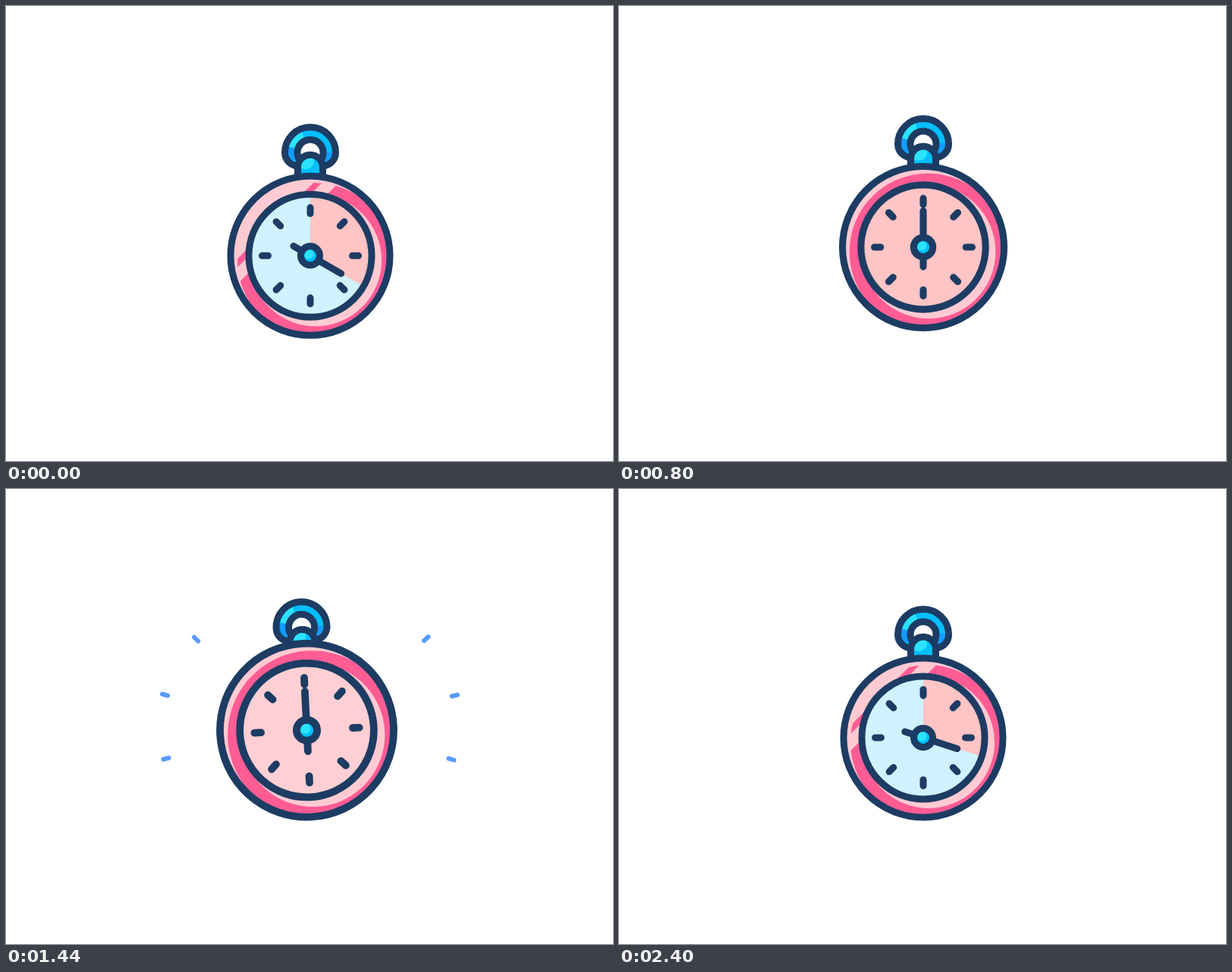
An HTML page for the animation above (2.44 s loop, 800 by 600 pixels).

```html
<!DOCTYPE html>
<html lang="en">
<head>
<meta charset="utf-8">
<title>Stopwatch</title>
<style>
  html, body { margin: 0; width: 100%; height: 100%; overflow: hidden; background: #fff; }
  svg { display: block; width: 100%; height: 100%; }
  .line { fill: none; stroke: #1d3c63; stroke-width: 9; stroke-linecap: round; }
  .spark { stroke: #5a9bff; stroke-width: 6; stroke-linecap: round; }
  .pale { fill: #ffcad2; }
  .rose { fill: #ff5c94; }
  .blue { fill: #00bfff; }
  .cyan { fill: #2ae3ff; }
  .deep { fill: #129cff; }
</style>
</head>
<body>
<svg viewBox="0 0 800 600">
  <defs>
    <clipPath id="rim"><circle r="103"/></clipPath>
    <clipPath id="loop"><path d="M-33.5 0A33.5 33.5 0 0 1 33.5 0C33.5 9 27 17 16 18H-16C-27 17-33.5 9-33.5 0Z"/></clipPath>
    <clipPath id="stem"><path d="M-16.5 34V19.5a16.5 16.5 0 0 1 33 0V34Z"/></clipPath>
  </defs>

  <g id="sparks"></g>

  <g id="watch">
    <g id="bow">
      <g clip-path="url(#loop)">
        <rect class="blue" x="-40" y="-40" width="80" height="80"/>
        <path class="cyan" d="M0 0L-60-16L-40-60L-20-50Z"/>
        <path class="deep" d="M0 0L-60-16V30ZM0 0L60-2V50Z"/>
      </g>
      <circle r="17" fill="#fff"/>
      <circle class="line" r="17"/>
      <path class="line" d="M-16 18C-27 17-33.5 9-33.5 0A33.5 33.5 0 0 1 33.5 0C33.5 9 27 17 16 18"/>
      <g clip-path="url(#stem)">
        <rect class="blue" x="-20" width="40" height="40"/>
        <circle class="cyan" cx="-6" cy="11" r="11"/>
      </g>
      <path class="line" d="M-16.5 34V19.5a16.5 16.5 0 0 1 33 0V34"/>
    </g>

    <g id="body">
      <g clip-path="url(#rim)">
        <circle class="pale" r="103"/>
        <circle class="rose" cx="6" cy="6" r="102"/>
        <circle class="pale" cx="7" cy="6" r="87"/>
        <g transform="rotate(45)">
          <g id="glint" class="pale">
            <rect x="-48" y="-120" width="48" height="240"/>
            <rect x="8" y="-120" width="15.5" height="240"/>
          </g>
        </g>
      </g>
      <circle r="80" fill="#cff2ff"/>
      <circle id="wedge" r="38.75" fill="none" stroke-width="77.5" pathLength="360"/>
      <circle class="line" r="105"/>
      <circle class="line" r="81"/>
      <g id="ticks"></g>
      <path id="hand" class="line" d="M0-47V25.5"/>
      <circle class="blue" r="12.5"/>
      <circle class="cyan" cx="-2" cy="-2" r="6.5"/>
      <circle class="line" r="12.5"/>
    </g>
  </g>
</svg>

<script>
const STEP = 40, STEPS = 61, RING = 20, RESET = 51;
const $ = id => document.getElementById(id);
const move = (id, value) => $(id).setAttribute('transform', value);

function add(parent, name, attrs) {
  const el = document.createElementNS('http://www.w3.org/2000/svg', name);
  for (const key in attrs) el.setAttribute(key, attrs[key]);
  return parent.appendChild(el);
}

for (let a = 0; a < 360; a += 45)
  add($('ticks'), 'path', { class: 'line', d: 'M0-55.5V-63.5', transform: `rotate(${a})` });

// outer end x, y and heading in degrees
const sparks = [
  [248, 195.5, 225], [206, 270.5, 194.5], [207.5, 356.5, 165],
  [556.5, 195, -42], [595, 271.5, -13.5], [590.5, 357.5, 17.5]
].map(([x, y, deg]) => ({
  x, y, dx: Math.cos(deg * Math.PI / 180), dy: Math.sin(deg * Math.PI / 180),
  el: add($('sparks'), 'line', { class: 'spark' })
}));

const clamp = v => Math.min(1, Math.max(0, v));
const ease = (t, from, to) => (1 - Math.cos(Math.PI * clamp((t - from) / (to - from)))) / 2;

// smooth curve through [time, value] pairs
function curve(keys, t) {
  const last = keys.length - 1;
  if (t <= keys[0][0]) return keys[0][1];
  if (t >= keys[last][0]) return keys[last][1];
  const i = keys.findIndex(k => k[0] > t) - 1;
  const slope = n => n <= 0 || n >= last ? 0 :
    (keys[n + 1][1] - keys[n - 1][1]) / (keys[n + 1][0] - keys[n - 1][0]);
  const [t0, v0] = keys[i], [t1, v1] = keys[i + 1];
  const w = t1 - t0, u = (t - t0) / w, u2 = u * u, u3 = u2 * u;
  return v0 * (2 * u3 - 3 * u2 + 1) + v1 * (3 * u2 - 2 * u3)
    + w * (slope(i) * (u3 - 2 * u2 + u) + slope(i + 1) * (u3 - u2));
}

const swell = [[15, 1], [20, 1.014], [28, 1.064], [34, 1.095], [36, 1.09], [42, 1.05], [44, 1.032], [50, 1]];
const tints = [[28, [255, 196, 196]], [36, [255, 207, 211]], [44, [223, 233, 243]], [50, [207, 242, 255]]];

function tint(t) {
  let i = 0;
  while (i < tints.length - 2 && t > tints[i + 1][0]) i++;
  const [t0, a] = tints[i], [t1, b] = tints[i + 1], u = clamp((t - t0) / (t1 - t0));
  return `rgb(${a.map((v, n) => Math.round(v + (b[n] - v) * u))})`;
}

function draw(t) {
  const run = (t - RESET + STEPS) % STEPS;
  const running = run <= 30;
  const angle = running ? run * 12 : 360;

  const y = 318 + 14.5 * (run < 14.5 ? ease(run, 0, 14.5) : 1 - ease(run, 14.5, 29.5));
  const shake = t > RING && t < RING + 19.8 ? -6.4 * Math.sin(2 * Math.PI * (t - RING) / 6.6) : 0;
  move('watch', `rotate(${shake} 401 406)`);
  move('bow', `translate(401 ${y - 136})`);
  move('body', `translate(401 ${y}) scale(${curve(swell, t)})`);

  move('hand', `rotate(${angle})`);
  const lag = Math.abs(shake) * 0.3;
  const wedge = $('wedge');
  move('wedge', `translate(${lag} ${lag}) rotate(-90)`);
  wedge.setAttribute('stroke', running ? '#ffc4c4' : tint(t));
  wedge.setAttribute('stroke-dasharray', angle < 360 ? `${angle} 400` : 'none');
  wedge.setAttribute('visibility', angle ? 'visible' : 'hidden');

  move('glint', `translate(${(run * 20 - 292) / Math.SQRT2})`);

  const head = 43 * (1 - ease(t, 20, 36));
  const tail = 43 * (1 - ease(t, 21, 41.6));
  for (const s of sparks) {
    s.el.setAttribute('x1', s.x - s.dx * head);
    s.el.setAttribute('y1', s.y - s.dy * head);
    s.el.setAttribute('x2', s.x - s.dx * tail);
    s.el.setAttribute('y2', s.y - s.dy * tail);
    s.el.setAttribute('visibility', tail - head > 0.1 ? 'visible' : 'hidden');
  }
}

function tick(now) {
  draw(Math.floor(now / STEP) % STEPS);
  requestAnimationFrame(tick);
}
draw(0);
requestAnimationFrame(tick);
</script>
</body>
</html>
```
